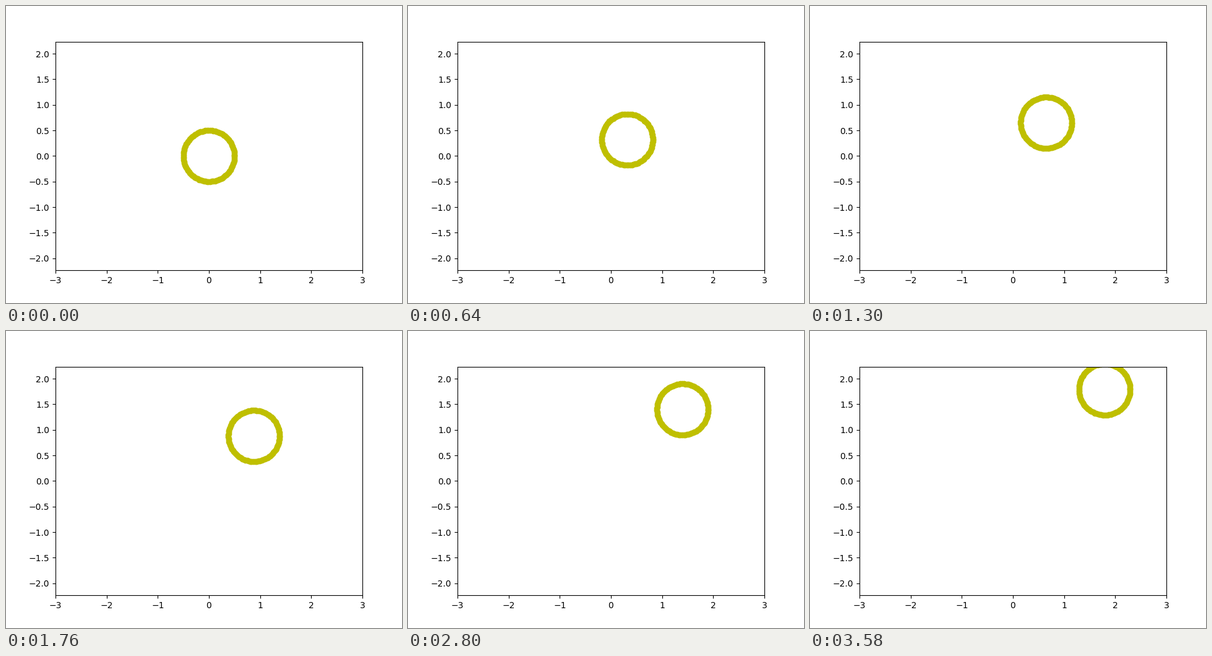
Recreate the animation shown at these times as a matplotlib script. Size 640x480 px, loop 3.6 s.

```python
import numpy as np
import matplotlib.pyplot as plt
from matplotlib.animation import FuncAnimation

FRAMES = 180
INTERVAL = 20    # ms
STEP = 0.01      # diagonal shift per frame, data units
RADIUS = 0.5
HALF_WIDTH = 3

fig, ax = plt.subplots(figsize=(6.4, 4.8), dpi=100)

# Equal scale on both axes
box = ax.get_position()
half_height = HALF_WIDTH * (box.height * 4.8) / (box.width * 6.4)
ax.set_xlim(-HALF_WIDTH, HALF_WIDTH)
ax.set_ylim(-half_height, half_height)

angle = np.linspace(0, 2 * np.pi, 100)
ring_x = RADIUS * np.cos(angle)
ring_y = RADIUS * np.sin(angle)
ring, = ax.plot(ring_x, ring_y, "yo")


def update(i):
    shift = STEP * i
    ring.set_data(ring_x + shift, ring_y + shift)
    return ring,


anim = FuncAnimation(fig, update, frames=FRAMES, interval=INTERVAL,
                     repeat=True, repeat_delay=0)
plt.show()
```
